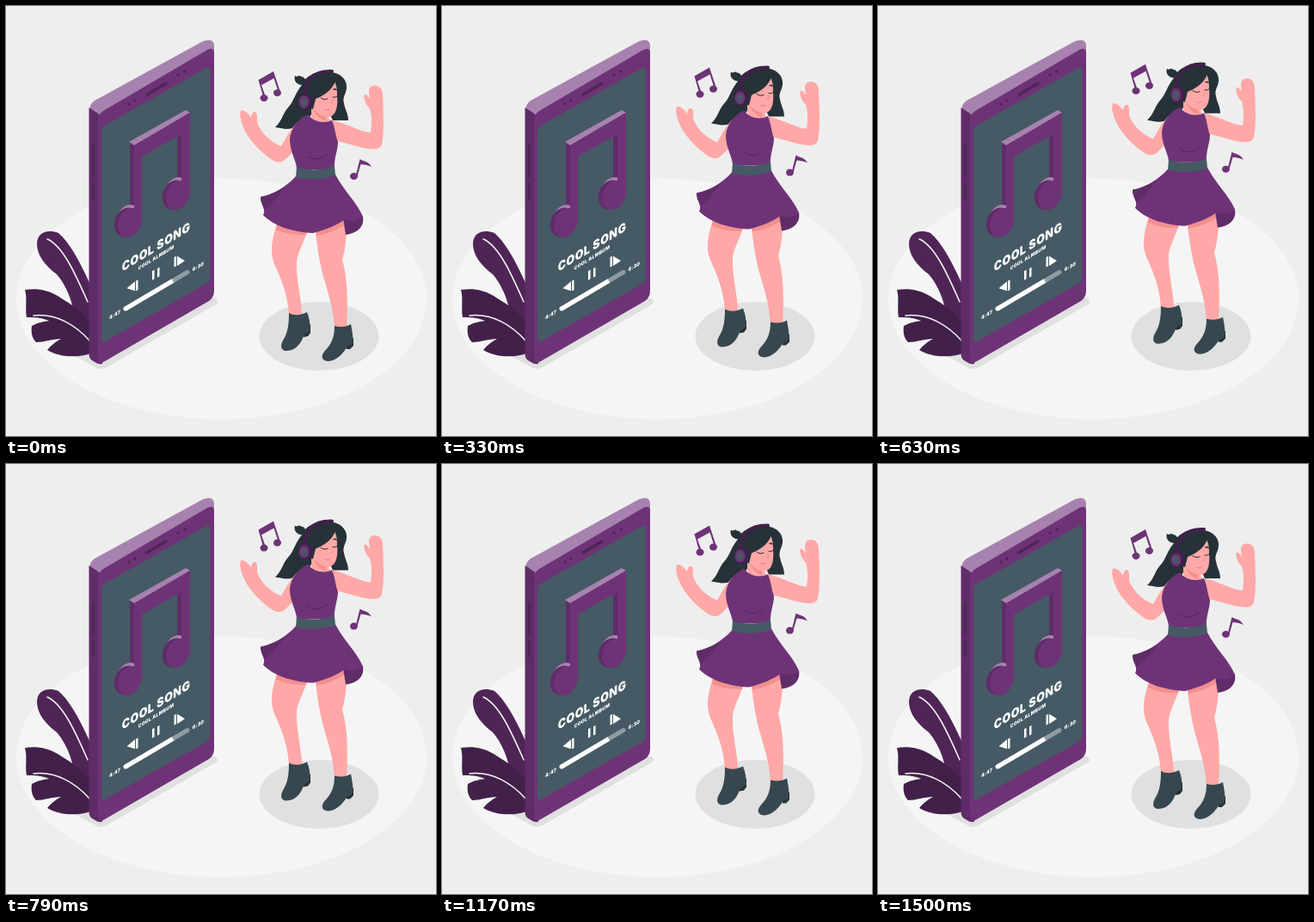
Write an HTML page that moves like this. It is 500 px wide and 500 px high and loops after 1.54 s.

```html
<!DOCTYPE html>
<html lang="en">
<head>
<meta charset="utf-8">
<title>Dancing to music</title>
<style>
  html, body { margin: 0; height: 100%; overflow: hidden; background: #eee; }
  svg { display: block; width: 100vw; height: 100vh; }
  text { font-family: Inter, sans-serif; font-weight: 900; fill: #fff; text-anchor: middle; }
  .main { fill: #6e3377; }
  .side { fill: #5f2c67; }
  .dark { fill: #4f2556; }
  .light { fill: #a782ae; }
  .skin { fill: #ffa8a7; }
  .shade { fill: #f28f8f; }
  .hair { fill: #263238; }
  .boot { fill: #37474f; }
  .screen { fill: #455a64; }
  .line { fill: none; stroke-linecap: round; stroke-linejoin: round; }
</style>
</head>
<body>
<svg viewBox="0 0 500 500">
  <defs>
    <g id="note-head">
      <ellipse class="light" cx="-3" cy="-3" rx="13.5" ry="17.5" transform="rotate(22)"/>
      <ellipse class="side" cx="-4" cy="1" rx="13.5" ry="17.5" transform="rotate(22)"/>
      <ellipse class="main" rx="13" ry="17.5" transform="rotate(22)"/>
    </g>
  </defs>

  <ellipse cx="250.5" cy="340.5" rx="238.5" ry="140" fill="#f5f5f5"/>
  <ellipse cx="364" cy="384" rx="69.5" ry="40" fill="#e0e0e0"/>
  <path d="M76 405L104 420Q110 424 117 420L244 347Q249 343 243 340L200 340Z" fill="#e0e0e0"/>

  <g id="leaves">
    <path class="dark" d="M78 352C75 338 69 324 59 312C46 302 36 290 36 277C36 264 47 259 61 264C72 273 84 293 97 322V374Z"/>
    <path d="M22 330C36 328 48 330 60 337C72 345 86 352 98 368V404C85 409 62 409 48 400C53 394 58 390 64 387C54 387 44 391 35 391C30 386 29 379 30 372C37 368 44 367 50 366C41 362 32 362 24 362C22 352 25 341 22 330Z" fill="#42204a"/>
    <g class="line" stroke="#f5f5f5" stroke-width="1.5">
      <path d="M48 271C66 279 80 310 95 344"/>
      <path d="M32 360C58 357 81 371 97 389"/>
    </g>
  </g>

  <g id="phone">
    <path class="light" d="M97 122Q97 114 103 110L229 41Q242 36 242 47V60L109 135Z"/>
    <path class="side" d="M96.500 118L107 125L112 130V416Q108 417 105 415L100 412Q96.500 410 96.500 404Z"/>
    <path class="main" d="M107 133Q107 126 113 122L234 51Q242 47 242 55V331Q242 339 236 343L115 413Q107 418 107 408Z"/>
    <path class="screen" d="M111 145Q111 141 115 139L233 72Q237 70 237 74V316Q237 320 233 323L115 390Q111 392 111 388Z"/>
    <g class="line" stroke="#4f2556">
      <path d="M164 103L186 90M143 114h.01M150 110h.01M200 80h.01M208 76h.01" stroke-width="3.500"/>
      <path d="M101.500 162V197M101.500 207V223" stroke-width="3"/>
    </g>
  </g>

  <g id="cover">
    <path class="side" d="M144 158L149 161V240H144ZM199 150L204 148V206H199Z"/>
    <use href="#note-head" x="144" y="252"/>
    <use href="#note-head" x="200" y="220"/>
    <path class="light" d="M143 158L209 121L214 124L149 162Z"/>
    <path class="main" d="M149 162L214 124V220H204V149L158 175V252H149Z"/>
  </g>

  <g id="player">
    <text transform="matrix(.866 -.53 0 1 174.500 285)" font-size="14.500" letter-spacing=".5">COOL SONG</text>
    <text transform="matrix(.866 -.53 0 1 174.500 294.500)" font-size="5.800" letter-spacing=".3">COOL ALMBUM</text>
    <text transform="matrix(.866 -.5 0 1 126.500 361)" font-size="6" letter-spacing=".2">4:47</text>
    <text transform="matrix(.866 -.5 0 1 223.500 305)" font-size="6" letter-spacing=".2">6:30</text>
    <path transform="translate(0 1.200)" fill="#fff" d="M140.500 327L150 319V330ZM151 318.500L153.500 317V329L151 330ZM170 307L172.500 305.500V316L170 317.500ZM176 304L178.500 302.500V313L176 314.500ZM195.500 291L198 289.500V301L195.500 302.500ZM199 289.500L208 295L199 301Z"/>
    <g class="line" stroke-width="5">
      <path d="M139 352L211 309.500" stroke="#8f9ca2"/>
      <path d="M139 352L194 319.500" stroke="#fff" stroke-linecap="butt"/>
      <path d="M139 352h.01" stroke="#fff"/>
    </g>
  </g>

  <g id="dancer">
    <!-- floating notes -->
    <g class="main">
      <path d="M293.500 86L311 76L319 100L317 101L311.500 84L297 92L302 106L299.500 107Z"/>
      <ellipse cx="300" cy="107" rx="4.500" ry="4"/>
      <ellipse cx="315.500" cy="101" rx="4.500" ry="4"/>
      <path d="M411.500 178C416 181 421 180 425 187C419 184 416 185 412.500 184L408.500 198H406.500Z"/>
      <ellipse cx="404.500" cy="198" rx="4.500" ry="4"/>
    </g>

    <!-- legs -->
    <path class="skin" d="M316 250C309 272 306 286 313 302C323 324 329 342 329 364H344C345 345 337 320 338 297C339 285 349 272 352 254Z"/>
    <path class="skin" d="M359 254C361 275 364 295 368 311C374 333 381 350 382 377H396C398 345 397 315 391 295C395 282 396 270 396 246Z"/>
    <path class="shade" d="M315 255L351 260L349 266C336 267 325 265 314 260ZM360 258L396 246V253C386 260 374 265 361 267Z"/>
    <path class="hair" d="M346 374L354 370V380L351 384L346 385ZM395 392L404 386V395L400 399L396 399Z"/>
    <path class="boot" d="M329 357C336 361 344 359 350 356C353 363 354 370 353 377C351 381 348 379 346 384C343 392 337 401 326 401C319 401 319 394 322 389C328 380 329 369 329 357Z"/>
    <path class="boot" d="M382 372C389 374 396 373 401 370C403 380 404 387 403 392C401 396 397 394 395 399C390 406 384 412 375 413C367 413 366 407 370 402C379 393 382 384 382 372Z"/>

    <!-- hair behind, arms, neck -->
    <path class="hair" d="M344 92C348 80 366 73 379 77C391 79 397 87 396 96C395 103 391 106 393 113C394 120 398 125 398 133H380L376 124L355 126C350 136 338 143 325 143L313 141C321 134 321 126 328 118C335 111 336 101 344 92Z"/>
    <path class="hair" d="M346 92C338 92 334 87 336 81C339 84 340 79 343 82C346 82 349 85 350 90Z"/>
    <path class="skin" d="M375 132C396 136 413 147 424 147C426 135 425 126 423 119C418 115 415 106 417 103C420 102 421 106 423 108C421 99 422 94 426 93C432 91 438 95 438 103C439 122 440 148 437 161C435 168 425 167 415 165L382 156Z"/>
    <path class="skin" d="M273 122C277 120 282 125 285 130C285 126 288 121 291 124C293 128 291 133 293 138C298 149 308 158 320 163C328 148 337 133 348 130L350 152C340 163 332 172 323 180C318 183 312 181 308 178C295 169 281 154 276 141C273 134 271 126 273 122Z"/>
    <path class="skin" d="M355 110V128C357 137 370 139 376 134L373 118Z"/>
    <path class="shade" d="M358 119C363 126 369 128 372 128V134C364 131 359 126 358 119Z"/>

    <!-- dress -->
    <path class="side" d="M392 247L395 266C409 264 417 256 415 245L406 231Z"/>
    <path class="main" d="M351 126C358 135 369 137 379 133C383 142 383 151 386 158C386 168 381 177 382 190H338C338 180 330 170 330 155C331 142 340 131 351 126Z"/>
    <path class="main" d="M337 198C325 211 311 219 296 222C296 231 303 237 299 243C310 255 333 263 357 264C372 260 385 255 394 248C401 252 410 250 415 245C408 228 392 214 383 196Z"/>
    <path class="side" d="M296 222C306 220 316 216 325 210C316 222 308 231 301 237C299 232 296 229 296 222Z"/>
    <path class="screen" d="M338 187C351 192 370 191 382 186L383 197C369 202 351 203 337 199Z"/>
    <path class="line" d="M350 174C357 180 367 179 373 173" stroke="#4f2556"/>

    <!-- head -->
    <path class="skin" d="M355 99L382 88C385 93 385 99 385 105C386 114 385 127 376 129C366 129 357 122 355 113Z"/>
    <path class="hair" d="M350 94C355 78 373 74 384 82C383 94 373 103 360 108L357 120L346 117Z"/>
    <g class="line" stroke="#263238">
      <path d="M366 107Q370 110 374 108M380 106Q383 107 385 105"/>
      <path d="M381 97Q383 96 384 97.500" stroke-width="1.500"/>
      <path d="M379 108L380 113L378 113" stroke="#f28f8f"/>
      <path d="M371 120Q374 122 376 120" stroke="#e0737a"/>
    </g>
    <path class="line" d="M347 104C346 88 357 75 379 76" stroke="#42204a" stroke-width="4"/>
    <ellipse cx="348.500" cy="111" rx="8.500" ry="9.500" fill="#42204a"/>
    <ellipse class="main" cx="346.500" cy="111.500" rx="6" ry="7.500"/>
    <ellipse class="screen" cx="346.500" cy="111.500" rx="3.500" ry="4.500"/>
  </g>
</svg>
<script>
  const LOOP = 1540, FPS = 24, STEPS = 36, LIFT = 10;
  const dancer = document.getElementById("dancer");
  const start = performance.now();

  // Linear rise and fall, stepped at 24 pictures a second.
  function draw() {
    const t = (performance.now() - start) % LOOP;
    const step = Math.min(STEPS, Math.floor((t + 5) * FPS / 1000));
    const rise = 1 - Math.abs(2 * step / STEPS - 1);
    dancer.setAttribute("transform", `translate(0 ${-LIFT * rise})`);
    requestAnimationFrame(draw);
  }
  draw();
</script>
</body>
</html>
```
